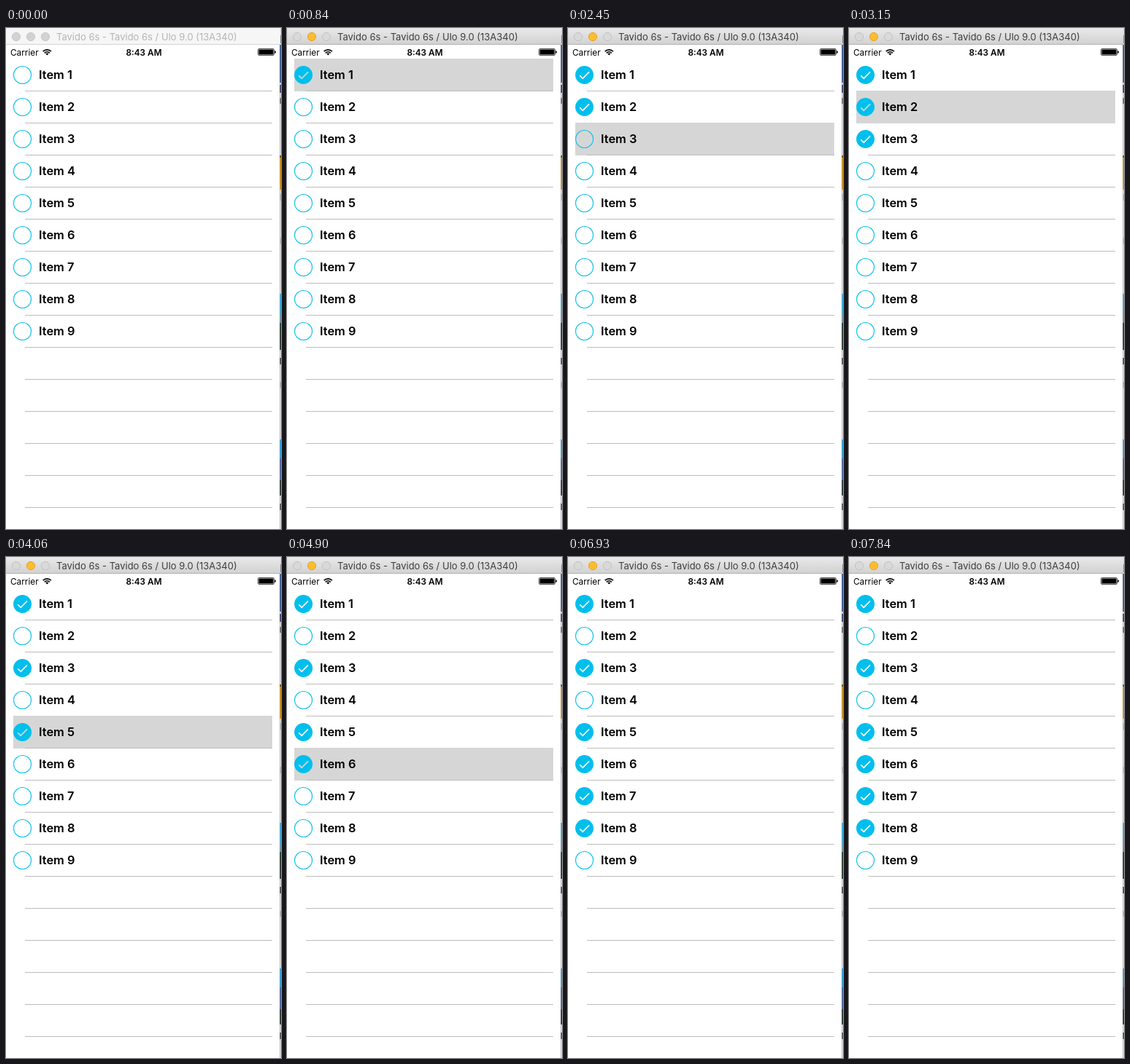
An HTML page that plays this animation: 377 px wide and 688 px high, repeating every 8 s.

```html
<!DOCTYPE html>
<html lang="en">
<head>
<meta charset="utf-8">
<title>Checklist</title>
<style>
  html, body { margin: 0; width: 100%; height: 100%; overflow: hidden; background: #fff; }
  svg { display: block; width: 377px; height: 688px; }
  text { font-family: Inter, "Open Sans", sans-serif; white-space: pre; }
  .title { font-size: 13px; fill: #3f3f3f; }
  .status { font-size: 11.8px; }
  .clock { font-weight: 600; }
  .item { font-size: 16.4px; font-weight: 600; }
  .inactive .title { fill: #b4b4b4; }
  .inactive .bar { fill: #f6f6f6; }
  .inactive .edge { fill: #d4d4d4; }
  .inactive .light { fill: #d2d2d2; stroke: #c6c6c6; }
  .bar { fill: url(#barShade); }
  .edge { fill: #b2b2b2; }
  .light { fill: #d9d9d9; stroke: #c2c2c2; }
  .light.amber { fill: #fdbd2f; stroke: #e3a32b; }
  .inactive .light.amber { fill: #d2d2d2; stroke: #c6c6c6; }
</style>
</head>
<body>
<svg viewBox="0 0 377 688">
  <defs>
    <linearGradient id="barShade" x2="0" y2="1">
      <stop stop-color="#e9e9e9"/><stop offset="1" stop-color="#d2d2d2"/>
    </linearGradient>
    <mask id="tickHole" maskUnits="userSpaceOnUse" x="-14" y="-14" width="28" height="28">
      <rect x="-14" y="-14" width="28" height="28" fill="#fff"/>
      <path d="M-6.3 .8 L-2.3 4.8 L6.5 -4.2" fill="none" stroke="#000" stroke-width="1.7"/>
    </mask>
  </defs>
  <rect width="377" height="688" fill="#fff"/>
  <g id="rows"></g>
  <g id="desktop" shape-rendering="crispEdges"></g>

  <g id="chrome" class="inactive">
    <rect class="bar" width="376" height="22"/>
    <rect class="edge" y="22" width="376" height="1"/>
    <circle class="light" cx="14" cy="12" r="5.6"/>
    <circle class="light amber" cx="34" cy="12" r="5.6"/>
    <circle class="light" cx="54" cy="12" r="5.6"/>
    <text class="title" x="69" y="17">Tavido 6s - Tavido 6s / Ulo 9.0 (13A340)</text>
  </g>

  <text class="status" x="6" y="38">Carrier</text>
  <g transform="translate(56.3 37.6)" fill="none" stroke="#000" stroke-width="1.7">
    <path d="M-5.6 -5.4 A7.9 7.9 0 0 1 5.6 -5.4 M-3.5 -3.2 A5 5 0 0 1 3.5 -3.2"/>
    <path d="M0 0 L-2 -2 A2.8 2.8 0 0 1 2 -2 Z" fill="#000" stroke="none"/>
  </g>
  <text class="status clock" x="189" y="38" text-anchor="middle">8:43 AM</text>
  <rect x="345.5" y="28.5" width="22" height="9" rx="1.5" fill="none" stroke="#000" stroke-width=".7"/>
  <rect x="346.5" y="29.5" width="20" height="7" rx=".6"/>
  <path d="M368.4 31.3 a1.8 1.8 0 0 1 0 3.6 Z"/>
</svg>
<script>
const LOOP = 8000, STEP = 70, ACTIVATED = 770;
const ROWS = 14, ITEMS = 9, PITCH = 44, TOP = 42;

// row, press time, fade start, fade end, checkbox change time, covers lower line
const taps = [
  [1,  840,  840, 1330,  840],
  [2, 1680, 1680, 2100, 1680],
  [3, 2450, 2520, 2940, 2520],
  [2, 3150, 3220, 3640, 3220, true],
  [5, 4060, 4060, 4550, 4060],
  [6, 4830, 4900, 5320, 4900],
  [7, 5740, 5810, 6230, 5810],
  [8, 6510, 6510, 6930, 6510],
  [9, 7280, 7420, 7840, Infinity],
].map(([row, press, from, to, toggle, covers]) => ({ row, press, from, to, toggle, covers }));

// y, height, colour of what shows beside the window
const slivers = [
  [10, 11, '#8b8f96'], [23, 52, '#38569b'], [78, 11, '#3b4468'], [96, 8, '#6d7076'],
  [175, 3, '#6b4a16'], [178, 44, '#d08f17'], [228, 9, '#b5b5b5'], [288, 9, '#b9b9bd'],
  [365, 28, '#35a9d8'], [393, 12, '#6c93a5'], [405, 37, '#21362b'], [453, 9, '#4b4b50'],
  [486, 8, '#b0b0b4'], [565, 26, '#2d9fd6'], [591, 30, '#49609b'], [621, 21, '#25332c'],
  [653, 9, '#55565c'],
];

function add(parent, tag, attrs, text) {
  const el = document.createElementNS('http://www.w3.org/2000/svg', tag);
  for (const key in attrs) el.setAttribute(key, attrs[key]);
  if (text) el.textContent = text;
  return parent.appendChild(el);
}

const chrome = document.getElementById('chrome');
const desktop = document.getElementById('desktop');
add(desktop, 'rect', { x: 375, y: 0, width: 1, height: 688, fill: '#c4c4c4' });
add(desktop, 'rect', { x: 376, y: 0, width: 1, height: 688, fill: '#e0e0e0' });
for (const [y, height, fill] of slivers) {
  add(desktop, 'rect', { x: 375, y, width: 1, height, fill, opacity: .6 });
  add(desktop, 'rect', { x: 376, y, width: 1, height, fill });
}

const list = document.getElementById('rows');
const rows = Array.from({ length: ROWS }, (_, i) => {
  const g = add(list, 'g', { transform: `translate(0 ${TOP + i * PITCH})` });
  const row = { number: i + 1 };
  if (i < ITEMS) {
    row.shade = add(g, 'rect', { x: 10, y: 0, width: 355, height: 45, fill: '#d6d6d6' });
    const box = add(g, 'g', { transform: 'translate(22.5 22.5)' });
    row.empty = add(box, 'circle', { r: 12, fill: 'none', stroke: '#12c2ec', 'stroke-width': 1.2 });
    row.full = add(box, 'circle', { r: 12.5, fill: '#00bfec', mask: 'url(#tickHole)' });
    add(g, 'text', { class: 'item', x: 45, y: 28 }, `Item ${i + 1}`);
  }
  row.line = add(g, 'rect', { x: 26, y: 44, width: 339, height: 1, fill: '#bcbcbc' });
  return row;
});

const ease = p => (1 - Math.cos(Math.PI * Math.min(1, Math.max(0, p)))) / 2;

function draw(time) {
  const t = Math.floor(time % LOOP / STEP) * STEP;
  chrome.setAttribute('class', t < ACTIVATED ? 'inactive' : '');
  for (const row of rows.slice(0, ITEMS)) {
    const mine = taps.filter(tap => tap.row === row.number);
    const checked = mine.filter(tap => t >= tap.toggle).length % 2 === 1;
    const tap = mine.find(tap => t >= tap.press && t < tap.to);
    const shade = tap ? 1 - ease((t - tap.from) / (tap.to - tap.from)) : 0;
    row.shade.setAttribute('opacity', shade);
    row.line.setAttribute('opacity', tap && tap.covers ? 1 - shade : 1);
    row.full.setAttribute('visibility', checked ? 'visible' : 'hidden');
    row.empty.setAttribute('visibility', checked ? 'hidden' : 'visible');
  }
}

const start = performance.now();
function tick() {
  draw(performance.now() - start);
  requestAnimationFrame(tick);
}
tick();
</script>
</body>
</html>
```
